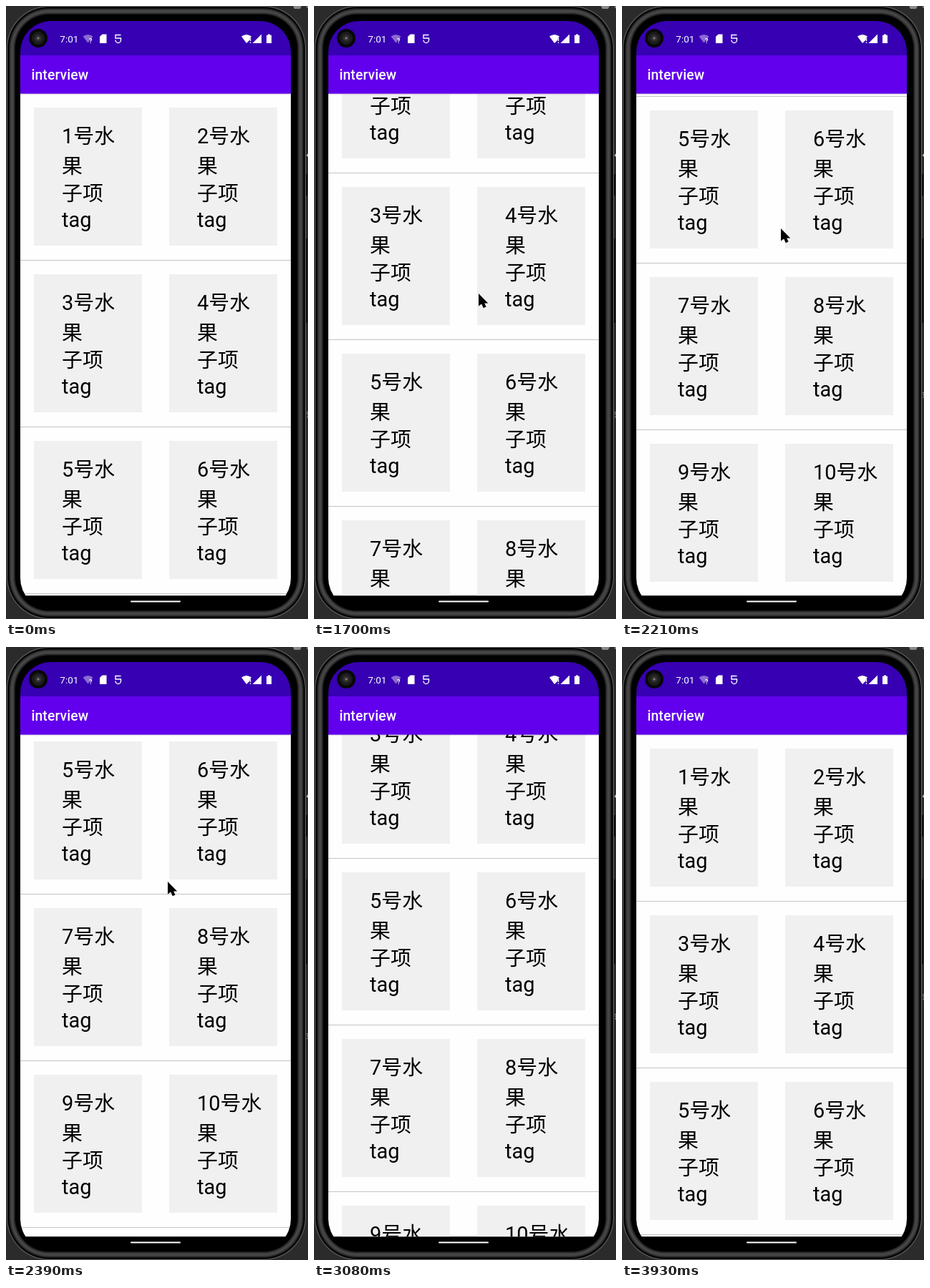
Write an HTML page that moves like this. It is 422 px wide and 857 px high and loops after 4.46 s.

```html
<!DOCTYPE html>
<html lang="zh-CN">
<head>
<meta charset="utf-8">
<title>interview</title>
<style>
  html, body { margin: 0; width: 100%; height: 100%; overflow: hidden; background: #2b2b2b; }
  svg { display: block; }
  text { font-family: Roboto, "Noto Sans CJK SC", "Noto Sans CJK", sans-serif; }
  #list text { font-size: 28.93px; fill: #000; }
</style>
</head>
<body>
<svg width="422" height="857" viewBox="0 0 422 857">
  <defs>
    <clipPath id="screen"><rect x="20" y="21" width="378" height="822" rx="43"/></clipPath>
    <linearGradient id="shade" x1="0" y1="0" x2="0" y2="1">
      <stop offset="0" stop-color="#000" stop-opacity=".15"/>
      <stop offset="1" stop-color="#000" stop-opacity="0"/>
    </linearGradient>
  </defs>

  <!-- desktop edge -->
  <path d="M401 0h12l-2 4h-8z" fill="#8a8a8a"/>
  <path d="M420 0h2v3h-2z" fill="#777"/>
  <path d="M422 206l-2.5 3 2.5 2z" fill="#bbb"/>
  <path id="mark" d="M420 0h2M420.5 1.5l2 3-2 3" fill="none" stroke="#a5a5a5"/>

  <!-- phone body -->
  <path d="M417 235h4v30h-4zM417 325h4v118h-4z" fill="#0c0c0c"/>
  <g id="rim"></g>

  <g clip-path="url(#screen)">
    <rect x="20" y="21" width="378" height="48" fill="#3700b3"/>
    <svg x="20" y="122" width="378" height="702.5" overflow="hidden">
      <rect width="378" height="703" fill="#fefefe"/>
      <g id="list"></g>
      <rect width="378" height="3" fill="url(#shade)"/>
    </svg>
    <rect x="20" y="69" width="378" height="53.600" fill="#6200ee"/>
    <rect x="20" y="824.500" width="378" height="20" fill="#000"/>
  </g>
  <rect x="174" y="831.500" width="70" height="2" rx="1" fill="#fff"/>

  <!-- status bar -->
  <circle cx="45" cy="45" r="13" fill="#080808"/>
  <circle cx="45" cy="45" r="9" fill="#1c1c1c"/>
  <circle cx="45" cy="45" r="5" fill="#2e2e2e"/>
  <circle cx="45" cy="45" r="1.800" fill="#777"/>
  <text x="75.300" y="51" font-size="13.500" fill="#fff">7:01</text>
  <path d="M107.500 42.500q7-5 14 0l-7 9z" fill="#8b6ad3"/>
  <text x="116" y="52" font-size="9" font-weight="700" fill="#fff">?</text>
  <path d="M134.500 39.500h6v12.500h-9.500v-9z" fill="#fff"/>
  <path d="M160.500 40.500h-7.500v4.500h7.500v2.500a3.700 4 0 0 1-7.500 0" fill="none" stroke="#fff" stroke-width="1.400"/>
  <path d="M329 42.500q7-5 14 0l-2.500 3.500v1.500l-4.500 4.500z" fill="#fff"/>
  <path d="M341.500 45v4M341.500 50.500v1.500" stroke="#fff" stroke-width="1.400"/>
  <path d="M357 39.500v12.500h-12.500z" fill="#fff"/>
  <path d="M366 39.500h3v1.300h2v11.200h-7v-11.200h2z" fill="#fff"/>

  <text x="35.400" y="103" font-size="19.300" font-weight="500" letter-spacing=".150" fill="#fff">interview</text>

  <path id="cursor" d="M0 0V17.500L4.200 14.500 6.800 20.200 10.500 18.600 8.200 13.500H13.200Z"/>
</svg>

<script>
const LOOP = 4460, START = 652, TICK = 173;
const PITCH = 233, ROWS = 8;
const el = id => document.getElementById(id);

const ring = (inset, grey) =>
  `<rect x="${inset}" y="${inset - 1}" width="${420 - 2 * inset}" height="${859 - 2 * inset}"
    rx="${60 - inset}" fill="rgb(${grey},${grey},${grey})"/>`;

// A thin bright edge, then a soft grey band fading into the black bezel.
function rim() {
  let out = ring(1, 100) + ring(2, 16);
  for (let d = 3; d <= 13; d++) out += ring(d, Math.round(72 * Math.sin(Math.PI * (d - 3) / 10)));
  return out;
}

const line = (x, y, s) => `<text x="${x}" y="${y}">${s}</text>`;

function tile(x, y, n) {
  const tx = x + 39;
  return `<rect x="${x}" y="${y}" width="151" height="193" fill="#f0f0f0"/>` +
    line(tx, y + 50, n + "号水") + line(tx, y + 92, "果") +
    line(tx, y + 130, "子项") + line(tx, y + 167, "tag");
}

function row(r) {
  const y = 20 + r * PITCH;
  return tile(19, y, 2 * r + 1) + tile(208, y, 2 * r + 2) +
    `<rect y="${y + 213}" width="378" height="1" fill="#c4c4c4"/>`;
}

el("rim").innerHTML = rim();
el("list").innerHTML = Array.from({ length: ROWS }, (_, r) => row(r)).join("");

const mix = (a, b, u) => a + (b - a) * u;
const span = (n, a, b) => Math.min(1, Math.max(0, (n - a) / (b - a)));
const easeOut = u => 1 - (1 - u) ** 4;

// Drag up, fling to rest, flick further, then fling back to the top.
function scroll(n) {
  if (n < 7) return 244 * span(n, 5, 7);
  if (n < 11) return mix(244, 477, easeOut(span(n, 7, 11)));
  if (n < 12) return 477;
  return mix(811, 0, span(n, 12, 15.130)) * (n < 15);
}

// The list stretches briefly when it hits the top.
const stretch = n => n < 15 ? 1 : 1 + .006 * Math.max(0, 17 - n);

// Key poses of the pointer: tick, x, y.
const poses = [[0, 406, 746], [1, 335, 659], [3, 299, 606], [5, 246, 526],
  [7, 214, 278], [10, 226, 328], [13, 268, 378]];

function pointer(n) {
  const i = poses.findIndex(p => p[0] >= n);
  if (n < 0 || i < 0) return null;
  const b = poses[i], a = poses[Math.max(0, i - 1)];
  const u = i ? span(n, a[0], b[0]) : 0;
  return [mix(a[1], b[1], u), mix(a[2], b[2], u)].map(Math.round);
}

const markY = t => 568 - 27.300 * Math.max(0, Math.floor((t - 840) / 1030));

function draw() {
  const t = performance.now() % LOOP;
  const n = Math.floor((t - START) / TICK), p = pointer(n);
  el("list").setAttribute("transform",
    `scale(1 ${stretch(n)}) translate(0 ${-Math.round(scroll(n))})`);
  el("mark").setAttribute("transform", `translate(0 ${markY(t)})`);
  el("cursor").setAttribute("visibility", p ? "visible" : "hidden");
  if (p) el("cursor").setAttribute("transform", `translate(${p})`);
  requestAnimationFrame(draw);
}
draw();
</script>
</body>
</html>
```
